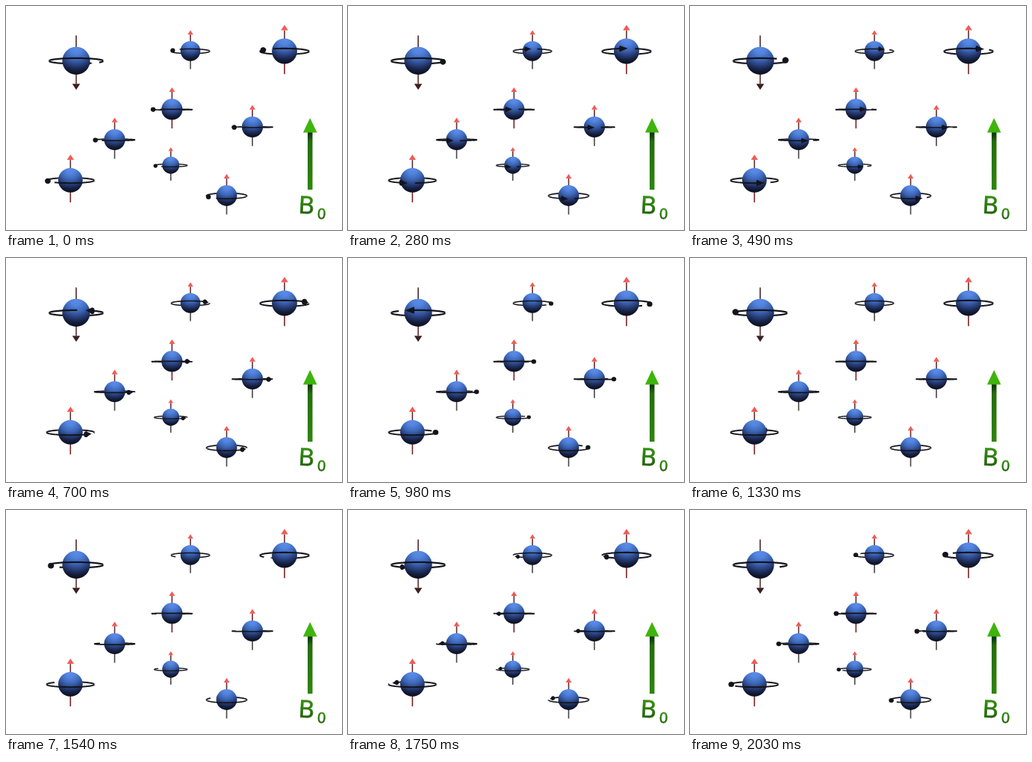
Recreate the animation shown at these times as an HTML page with a canvas. Size 450 by 300 pixels, loop 2.1 s.

```html
<!DOCTYPE html>
<html lang="en">
<head>
<meta charset="utf-8">
<title>Spins in a magnetic field</title>
<style>
  html, body { margin: 0; width: 100%; height: 100%; overflow: hidden; background: #fff; }
  canvas { display: block; width: 450px; height: 300px; }
</style>
</head>
<body>
<canvas id="stage" width="450" height="300"></canvas>
<script>
const ctx = document.getElementById('stage').getContext('2d');
const LOOP = 2100, STEP = 70, GAP = 30;
const INK = '#14141c';
const rad = deg => deg * Math.PI / 180;

// x, y, orbit radius, colour of the far shaft, direction of the spin
const spin = (x, y, R, shaft = '#484444', dir = 1) => ({ x, y, R, shaft, dir });
const spins = [
  spin(94, 73.3, 36.3, '#4a2626', -1),
  spin(247, 60.3, 26),
  spin(373, 60.5, 33, '#782424'),
  spin(222.3, 138.4, 27.5, '#782424'),
  spin(330, 162, 27.5),
  spin(145.5, 179, 27.5),
  spin(86.3, 233.3, 32, '#782424'),
  spin(220.7, 213.2, 22.3),
  spin(295.5, 254, 27.2)
];

function triangle(x, tip, base, half, color) {
  ctx.fillStyle = color;
  ctx.beginPath();
  ctx.moveTo(x, tip);
  ctx.lineTo(x - half, base);
  ctx.lineTo(x + half, base);
  ctx.fill();
}

function axis({ x, y, R, shaft, dir }) {
  const near = y - dir * R * 0.85, far = y + dir * R * 0.93;
  ctx.lineWidth = 1.6;
  for (const [end, color] of [[near, '#5e2e2e'], [far, shaft]]) {
    ctx.strokeStyle = color;
    ctx.beginPath();
    ctx.moveTo(x, y);
    ctx.lineTo(x, end);
    ctx.stroke();
  }
  triangle(x, y - dir * R * 1.07, near, R * 0.145, dir > 0 ? '#f35a55' : '#3a2020');
}

// Lit from above, almost black underneath
function ball({ x, y, R }) {
  const r = R * 0.513, top = y - r * 0.9;
  const g = ctx.createRadialGradient(x, top, 0, x, top, r * 1.9);
  g.addColorStop(0, '#5a8ce8');
  g.addColorStop(0.2, '#5384de');
  g.addColorStop(0.45, '#3c66b6');
  g.addColorStop(0.65, '#283f7a');
  g.addColorStop(0.85, '#141d3a');
  g.addColorStop(1, '#0a0e1c');
  ctx.fillStyle = g;
  ctx.beginPath();
  ctx.arc(x, y, r, 0, 2 * Math.PI);
  ctx.fill();
}

// Orbit angle 0 is at the left, 90 is nearest to the viewer
function orbit(s, head, front) {
  const { x, y, R, dir } = s;
  const tilt = (y - 150) * 0.04 * R / 30;
  const at = (deg, k = 1) => [x - k * R * Math.cos(rad(deg)), y + 0.3 + k * tilt * Math.sin(rad(deg))];
  const isFront = deg => Math.sin(rad(deg)) >= 0;

  ctx.strokeStyle = INK;
  ctx.lineWidth = R * 0.062;
  ctx.beginPath();
  for (let d = GAP; d < 354; d += 3) {
    const a = head + dir * d;
    if (isFront(a + dir * 1.5) !== front) continue;
    ctx.moveTo(...at(a));
    ctx.lineTo(...at(a + dir * 3));
  }
  ctx.stroke();

  if (isFront(head) !== front) return;
  const base = head - dir * 6, a = rad(base);
  const [bx, by] = at(base, 0.97);
  const near = 1 + 0.12 * Math.sin(a);
  const r = R * 0.11 * near, len = R * 0.29 * near * dir;
  ctx.fillStyle = INK;
  ctx.beginPath();
  ctx.ellipse(bx, by, r * Math.abs(Math.cos(a)) + 0.3, r, 0, 0, 2 * Math.PI);
  ctx.fill();
  ctx.beginPath();
  ctx.moveTo(bx, by - r);
  ctx.lineTo(bx + len * Math.sin(a), by + len * tilt / R * Math.cos(a));
  ctx.lineTo(bx, by + r);
  ctx.fill();
}

function label(text, size, x, y) {
  const g = ctx.createLinearGradient(0, -size * 0.73, 0, 0);
  g.addColorStop(0, '#32900f');
  g.addColorStop(1, '#22640a');
  ctx.save();
  ctx.translate(x, y);
  ctx.rotate(rad(3));
  ctx.fillStyle = ctx.strokeStyle = g;
  ctx.lineWidth = 0.5;
  ctx.font = size + 'px "DejaVu Sans", sans-serif';
  ctx.fillText(text, 0, 0);
  ctx.strokeText(text, 0, 0);
  ctx.restore();
}

function field() {
  const g = ctx.createLinearGradient(0, 169, 0, 246);
  g.addColorStop(0, '#0c2f08');
  g.addColorStop(0.08, '#174a0e');
  g.addColorStop(0.16, '#266c0c');
  g.addColorStop(1, '#2f860c');
  ctx.fillStyle = g;
  ctx.fillRect(404, 168, 6.5, 78);
  triangle(407.2, 150, 169.5, 9.3, '#3eb40c');
  label('B', 32, 391, 277.4);
  label('0', 19, 416.3, 284.7);
}

function draw(now) {
  const turn = Math.floor(now % LOOP / STEP) * STEP / LOOP * 360;
  ctx.fillStyle = '#fff';
  ctx.fillRect(0, 0, 450, 300);
  for (const s of spins) {
    const head = s.dir > 0 ? 25 + (s.x - 225) * 0.05 + turn : 242 - turn;
    axis(s);
    orbit(s, head, false);
    ball(s);
    orbit(s, head, true);
  }
  field();
}

const start = performance.now();
function tick() {
  draw(performance.now() - start);
  requestAnimationFrame(tick);
}
tick();
</script>
</body>
</html>
```
